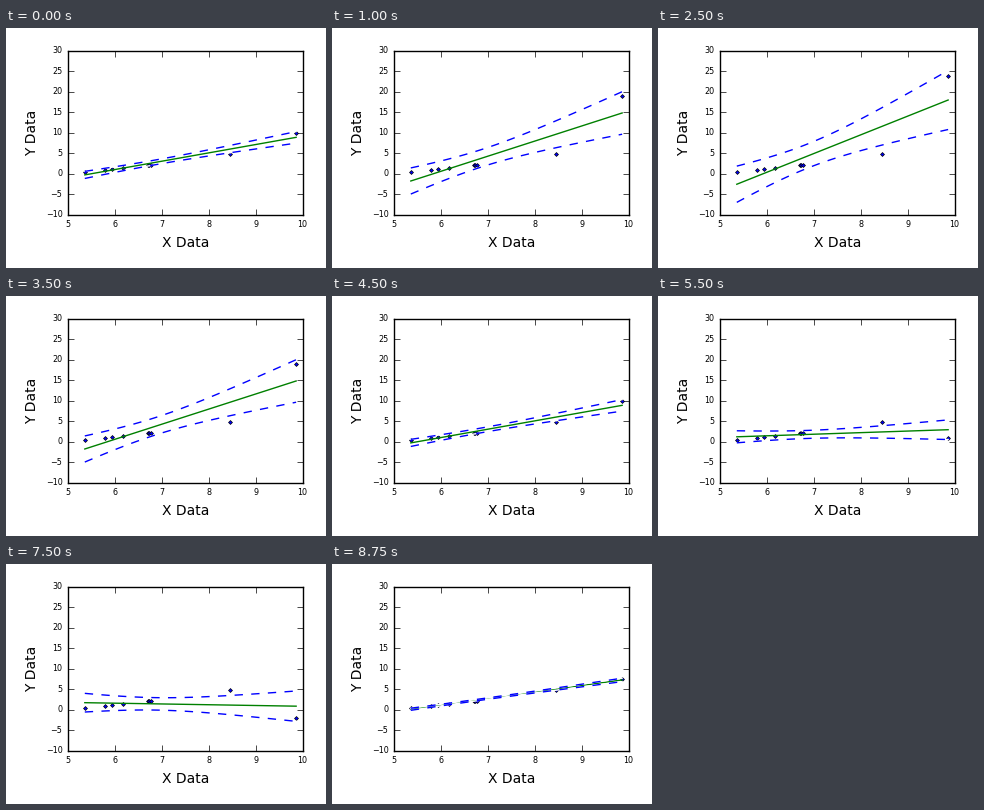
Write a matplotlib script that moves like this. It is 320 px wide and 240 px high and loops after 9000 ms.

```python
import numpy as np
import matplotlib.pyplot as plt
from matplotlib.animation import FuncAnimation

FRAMES, INTERVAL = 36, 250
WIDTH, HEIGHT, DPI = 320, 240, 100
T_95 = 2.3646  # Student t, two-sided 95 %, 7 degrees of freedom

plt.rcParams.update({
    "font.family": "DejaVu Sans",
    "font.size": 10,
    "lines.linewidth": 1.0,
    "lines.scale_dashes": False,
    "lines.dashed_pattern": [6, 6],
    "axes.linewidth": 1.0,
})

x = np.array([5.357, 5.797, 5.936, 6.161, 6.697, 6.731, 6.775, 8.442, 9.861])
y = np.array([0.376, 0.874, 1.049, 1.327, 2.054, 2.077, 2.138, 4.744, 7.104])
grid = np.linspace(x.min(), x.max(), 100)


def fit(xs, ys):
    """Least-squares line on the grid and the half-width of its confidence band."""
    dx = xs - xs.mean()
    sxx = np.sum(dx ** 2)
    slope = np.sum(dx * ys) / sxx
    resid = ys - ys.mean() - slope * dx
    s = np.sqrt(np.sum(resid ** 2) / (len(xs) - 2))
    g = grid - xs.mean()
    return ys.mean() + slope * g, T_95 * s * np.sqrt(1 / len(xs) + g ** 2 / sxx)


fig = plt.figure(figsize=(WIDTH / DPI, HEIGHT / DPI), dpi=DPI, facecolor="white")
ax = fig.add_axes([62.05 / WIDTH, 53.45 / HEIGHT, 234.6 / WIDTH, 164 / HEIGHT])
ax.set_xlim(5, 10)
ax.set_ylim(-10, 30)
ax.set_xticks(range(5, 11))
ax.set_yticks(range(-10, 31, 5))
ax.tick_params(direction="in", length=4, width=0.5, pad=4,
               top=True, right=True, labelsize="xx-small")
for label in ax.get_yticklabels():
    label.set_va("center")
ax.set_xlabel("X Data", labelpad=5)
ax.set_ylabel("Y Data", labelpad=5)

points, = ax.plot([], [], "D", ms=2, mfc="blue", mec="black", mew=0.5)
line, = ax.plot([], [], color="green")
halos = [ax.plot([], [], color="white")[0] for _ in range(2)]
bands = [ax.plot([], [], "--", color="blue")[0] for _ in range(2)]


def update(i):
    ys = y.copy()
    ys[-1] = 1.4 * y[-1] + 13.94 * np.sin(2 * np.pi * i / FRAMES)
    mid, half = fit(x, ys)
    points.set_data(x, ys)
    line.set_data(grid, mid)
    for halo, band, edge in zip(halos, bands, (mid + half, mid - half)):
        halo.set_data(grid, edge)
        band.set_data(grid, edge)
    return [points, line, *halos, *bands]


anim = FuncAnimation(fig, update, frames=FRAMES, interval=INTERVAL,
                     repeat=True, repeat_delay=0)
plt.show()
```
